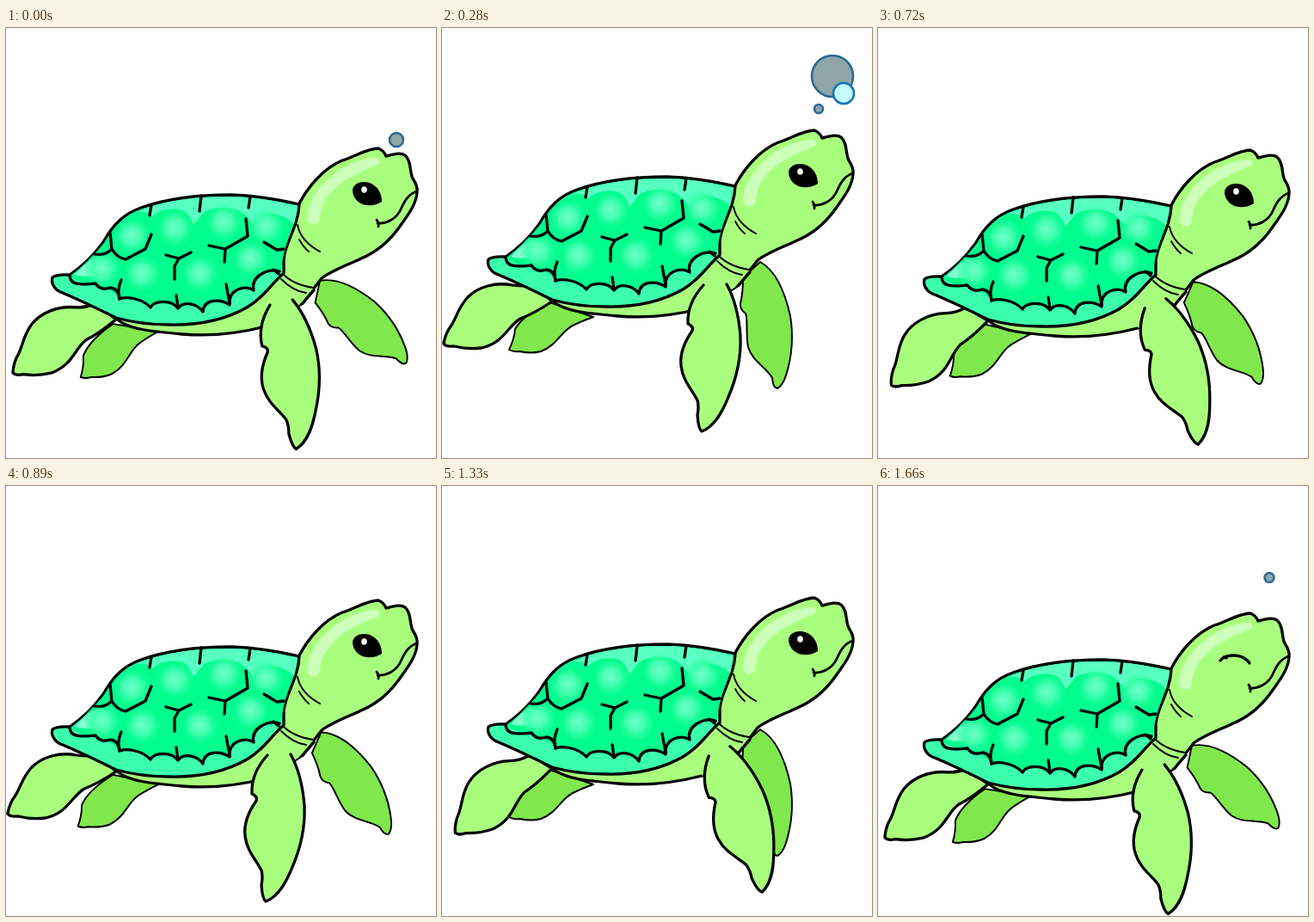
An HTML page without scripts that plays this animation: 500x500 px, repeating every 1720 ms.

```html
<!DOCTYPE html>
<html lang="en">
<head>
<meta charset="utf-8">
<title>Swimming turtle</title>
<style>
  @property --rise  { syntax: "<length>"; inherits: true; initial-value: 0px; }
  @property --near  { syntax: "<number>"; inherits: true; initial-value: 0; }
  @property --far   { syntax: "<number>"; inherits: true; initial-value: 0; }
  @property --blink { syntax: "<number>"; inherits: true; initial-value: 0; }

  html, body { margin: 0; width: 100%; height: 100%; overflow: hidden; background: #fff; }
  svg { display: block; width: 100%; height: 100%; }

  .turtle, .bubbles circle { animation: 1720ms step-end infinite; }
  .turtle { animation-name: swim; transform: translateY(var(--rise)); }

  /* Limbs swing as triangle waves; near and far pairs are out of phase. */
  .front-near { transform-origin: 317px 285px; transform: rotate(calc(var(--near) * 11deg)); }
  .rear-near  { transform-origin: 125px 318px; transform: rotate(calc(var(--near) * 6.2deg)); }
  .rear-far   { transform-origin: 150px 325px; transform: rotate(calc(var(--far) * 3.1deg)); }
  .front-far  {
    transform-origin: 368px 280px;
    transform: rotate(calc(var(--far) * 12.7deg)) scaleY(calc(1 + var(--far) * .022));
  }

  .eye { opacity: calc(1 - var(--blink)); }
  .lid { opacity: var(--blink); }

  @keyframes swim {
    0%, 100%         { --rise: 21px;  --near: -1; --far: -3; --blink: 0; }
    3.488%, 51.744%  { --rise: 14px;  --near: 0;  --far: -2; --blink: 0; }
    9.884%, 58.14%   { --rise: 7px;   --near: 1;  --far: -1; --blink: 0; }
    16.279%, 64.535% { --rise: 0px;   --near: 0;  --far: 0;  --blink: 0; }
    22.674%, 70.93%  { --rise: 5.5px; --near: -1; --far: 1;  --blink: 0; }
    29.07%, 77.326%  { --rise: 11px;  --near: -2; --far: 0;  --blink: 0; }
    35.465%, 83.721% { --rise: 17px;  --near: -3; --far: -1; --blink: 0; }
    41.86%, 90.116%  { --rise: 23px;  --near: -2; --far: -2; --blink: 0; }
    48.256%, 96.512% { --rise: 29px;  --near: -1; --far: -3; --blink: 1; }
  }

  .bubbles circle { r: 0; fill: #8fa6a8; stroke: #2d6a96; stroke-width: 2.6; }
  .bubbles .bright { fill: #c5fbff; stroke: #1574ba; }
  .bubbles .first  { animation-name: first; }
  .bubbles .second { animation-name: second; }
  .bubbles .third  { animation-name: third; }
  .bubbles .bright { animation-name: bright; }

  @keyframes first {
    0%      { cx: 454px; cy: 130px; r: 8px; }
    3.488%  { cx: 454px; cy: 106px; r: 13px; }
    9.884%  { cx: 454px; cy: 81px;  r: 18px; }
    16.279% { cx: 454px; cy: 56px;  r: 24px; }
    22.674% { cx: 454px; cy: 30px;  r: 25px; }
    29.07%  { r: 0px; }
    96.512% { cx: 455px; cy: 106.5px; r: 5.5px; }
  }
  @keyframes second {
    0%      { r: 0px; }
    16.279% { cx: 438px; cy: 94px; r: 5px; }
    22.674% { cx: 446px; cy: 80px; r: 14px; }
    29.07%  { cx: 455px; cy: 67px; r: 24px; }
    35.465% { r: 0px; }
  }
  @keyframes third {
    0%      { r: 0px; }
    22.674% { cx: 465px; cy: 122px; r: 6px; }
    29.07%  { cx: 465px; cy: 114px; r: 12px; }
    35.465% { r: 0px; }
  }
  @keyframes bright {
    0%      { r: 0px; }
    9.884%  { cx: 470px; cy: 101px; r: 8px; }
    16.279% { cx: 467px; cy: 76px;  r: 12px; }
    22.674% { cx: 449px; cy: 51px;  r: 15px; }
    29.07%  { cx: 430px; cy: 27px;  r: 17px; }
    35.465% { r: 0px; }
  }

  .skin { fill: #a9ff7d; }
  .shade { fill: #80e84c; stroke-width: 2; }
  .line { fill: none; }
  .thin { stroke-width: 1.9; }
  .plain { stroke: none; }
  .rim { fill: #3cffad; }
  .plate { fill: #00fd8d; }
  .sheen { fill: #58ffc2; }
</style>
</head>
<body>
<svg viewBox="0 0 500 500" xmlns="http://www.w3.org/2000/svg">
  <defs>
    <radialGradient id="glow" fx=".46" fy=".46">
      <stop offset="0" stop-color="#70ffc6"/>
      <stop offset=".5" stop-color="#43ffb0"/>
      <stop offset="1" stop-color="#20ff9e" stop-opacity=".1"/>
    </radialGradient>
    <circle id="bump" r="21" fill="url(#glow)" stroke="none"/>
  </defs>

  <g class="turtle" stroke="#000" stroke-width="3.3" stroke-linecap="round" stroke-linejoin="round">
    <path class="rear-far shade" d="M125 319C108 327 92 338 85 350Q84 362 78 374Q83 377 90 376Q104 379 115 376C134 369 138 353 152 346Q162 341 176 336Z"/>
    <path class="front-far shade" d="M370 272C388 282 399 308 405 335C409 360 406 385 400 404Q396 416 390 419Q385 419 384 407C378 395 361 388 356 371C353 356 356 338 353 332Q346 327 347 320Q350 308 350 290Z"/>
    <path class="rear-near skin" d="M128 318C118 309 112 301 104 298Q93 301 82 299C62 295 42 301 30 313C17 327 17 339 8 350Q3 359 2 367Q5 371 14 370Q30 374 46 372C72 366 76 347 91 338Q107 332 128 318Z"/>

    <path class="skin" d="M128 316C138 329 170 332 205 335C240 338 275 333 302 326L345 299L358 284L323 240L140 290Z"/>
    <path class="skin" d="M341 183C351 164 369 142 391 133C407 128 420 119 433 119Q439 121 442 128C450 126 459 123 464 127C472 134 469 147 473 154Q479 163 478 170C477 185 466 198 457 211C447 225 432 239 413 247C396 255 379 261 367 270Q356 284 345 299L318 290L308 240L330 190Z"/>
    <path class="skin plain" d="M300 286L323 258L358 281L340 302L302 326Z"/>

    <path fill="#ccffb9" class="plain" d="M432 130C404 130 376 149 361 170C350 188 347 204 355 207Q364 209 365 200C366 186 372 176 382 166C396 153 412 146 432 138Q439 134 432 130Z"/>
    <path class="line thin" d="M339 208C342 224 354 233 365 239M341 225Q346 234 352 239M321 264C331 275 345 279 357 281M320 271Q334 285 349 287"/>
    <path class="line" stroke-width="2.8" d="M477 169C467 173 463 181 459 190C454 201 442 207 432 206M431 202Q434 206 433 210"/>
    <g class="eye plain">
      <path d="M403 167C405 158 416 156 425 160C433 164 437 172 437 181C430 186 418 187 411 182C405 178 403 172 403 167Z"/>
      <ellipse cx="416.500" cy="167" rx="3.300" ry="3.800" fill="#fff"/>
    </g>
    <path class="lid line" d="M398 174Q402 169 405 171M402 170C414 166 426 168 432 177"/>

    <path class="rim" d="M54 269Q59 265 74 266C92 254 103 242 113 228C125 207 137 195 157 188C188 177 226 173 262 173C293 174 318 179 341 184C340 210 324 229 323 248V264C307 278 300 292 280 304C257 317 230 325 190 324C167 324 146 321 128 316C108 306 87 296 66 287C56 284 52 275 54 269Z"/>
    <path class="plate plain" d="M74 268C92 254 104 241 114 229C126 209 138 198 157 190C188 179 226 175 262 175C293 176 318 181 339 186C337 210 322 230 320 262C304 258 284 268 288 284C278 277 258 283 260 300C250 294 230 293 229 308C222 299 206 296 200 305C192 294 172 296 168 303C158 293 140 291 132 294Q124 283 104 278Q88 276 74 268Z"/>
    <path class="sheen plain" d="M150 194C185 178 226 175 262 175C293 176 318 181 339 186L335 207Q322 194 303 195Q292 198 287 208Q281 197 270 191Q248 184 230 193Q225 200 218 208Q214 196 206 191Q184 186 170 198Q163 191 150 194Z"/>
    <path fill="#86ffd0" class="plain" d="M80 266Q95 248 108 246Q96 256 102 267Q90 269 80 266Z"/>
    <use href="#bump" x="147" y="221"/>
    <use href="#bump" x="197" y="212"/>
    <use href="#bump" x="254" y="205"/>
    <use href="#bump" x="303" y="210"/>
    <use href="#bump" x="112" y="260"/>
    <use href="#bump" x="159" y="265"/>
    <use href="#bump" x="226" y="265"/>
    <use href="#bump" x="285" y="248"/>

    <g class="line">
      <path d="M74 267C75 280 92 277 104 276Q110 285 121 281Q131 282 132 294C140 291 158 293 168 304C172 296 192 294 200 305C206 296 222 299 229 309C230 293 250 294 260 301C258 283 278 277 288 284C284 268 304 258 318 262"/>
      <path d="M121 217L123 236Q129 246 139 248L162 236L169 219M122 237Q114 244 103 242M186 243L201 247L215 240M201 247L196 256V271M236 232L255 236L281 221L279 201M255 236L254 251M300 228L315 237L323 236M169 185L167 197M227 174L225 192M284 175L282 188M134 272Q129 283 132 294M198 290L200 304M256 277L260 299M311 260L317 265"/>
    </g>

    <path class="front-near skin" d="M304 299C293 311 285 326 286 344Q293 347 291 352C284 362 276 377 278 393C280 411 292 422 297 433Q299 440 297 450Q298 466 302 469C318 463 327 444 333 429C343 406 348 383 347 358C345 333 340 314 331 298"/>
  </g>

  <g class="bubbles">
    <circle class="first"/>
    <circle class="second"/>
    <circle class="third"/>
    <circle class="bright"/>
  </g>
</svg>
</body>
</html>
```
